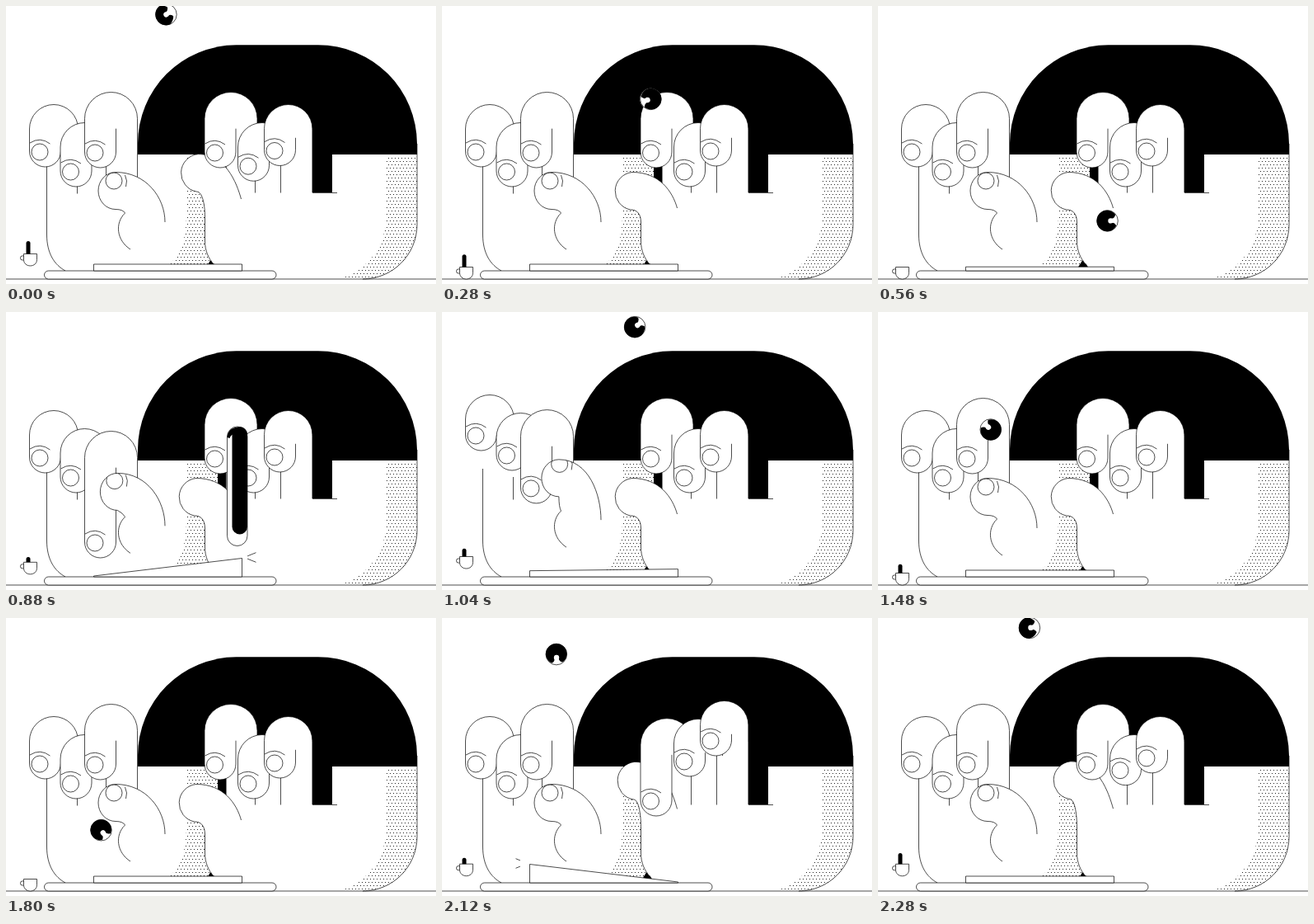
An HTML page that plays this animation: 522 by 337 pixels, repeating every 2.32 s.

```html
<!DOCTYPE html>
<html lang="en">
<head>
<meta charset="utf-8">
<title>Juggling hands</title>
<style>
html, body { margin: 0; width: 100%; height: 100%; overflow: hidden; background: #fff; }
svg { display: block; width: 522px; height: 337px; }
.line { fill: none; stroke: #000; stroke-width: .7; }
.skin { fill: #fff; stroke: #000; stroke-width: .7; }
.white { fill: #fff; }
</style>
</head>
<body>
<svg viewBox="0 0 522 337">
  <defs>
    <pattern id="dots" width="4" height="8" patternUnits="userSpaceOnUse">
      <path d="M0 0h1v1H0zM2 4h1v1H2z" fill="#222"/>
    </pattern>
    <clipPath id="thumbClip"><path id="thumbClipPath"/></clipPath>
    <clipPath id="ballClip"><circle r="13"/></clipPath>
  </defs>

  <!-- big rounded figure -->
  <path d="M160 180V167A119.500 119.500 0 0 1 279.500 47.300H379A120 120 0 0 1 499 167V180H396V226H257V180Z"/>
  <path d="M219 181H257V262H241V290L250 313H199C214 298 219 280 219 250Z" fill="url(#dots)"/>
  <path d="M462 181H499V265A66 66 0 0 1 433 331H405C440 319 462 292 462 250Z" fill="url(#dots)"/>
  <path class="line" d="M499 167V265A66 66 0 0 1 433 331M372 226.500H402M0 331H522"/>
  <path d="M249 307L242 318H256Z"/>

  <!-- right hand -->
  <path class="white" d="M267.500 150H372V313H267.500Z"/>
  <path class="skin" id="thumbR"/>
  <path class="line" d="M302.500 190V226.500M333.500 165V226.500"/>
  <g id="handR"></g>

  <!-- left hand -->
  <path class="white" d="M49.500 190H159V321H72C58 314 49.500 300 49.500 280Z"/>
  <path class="line" d="M49.500 190V277C49.500 300 59 314 72 321M86.500 200V227.500M121.500 190V227.500"/>
  <g id="handL"></g>
  <path class="skin" id="thumbL"/>
  <g clip-path="url(#thumbClip)">
    <g id="thumbNail">
      <circle class="line" r="10"/>
      <path class="line" d="M13.500 -7Q17 0 14.500 7"/>
    </g>
  </g>

  <rect class="skin" x="46.500" y="321" width="281.500" height="10" rx="5"/>
  <path class="skin" id="lever"/>
  <path class="line" id="sparks"/>

  <rect id="coffee" x="24.500" width="5" rx="2.500"/>
  <g id="cup">
    <path class="skin" d="M21.500 3H19.500Q17.500 3 17.500 5.500T19.500 8H21.500"/>
    <path class="skin" d="M21.500 .5H37.500V7.500C37.500 12 34 15 29.500 15S21.500 12 21.500 7.500Z"/>
  </g>

  <g id="ball">
    <circle class="white" r="13"/>
    <g clip-path="url(#ballClip)">
      <g id="spin">
        <circle id="shade" r="13"/>
        <g id="mark" class="white">
          <circle cx="4" r="3.200"/>
          <path d="M5 -2.500Q9 -3 10 -8H18V7H11Q9 2 5 2.500Z"/>
        </g>
      </g>
    </g>
    <circle class="line" r="12.800"/>
  </g>
  <g id="streak">
    <rect class="skin" id="streakOut" width="24.500" rx="12.250"/>
    <rect id="streakIn" x="6" width="18.500" rx="9.250"/>
    <path d="M0 13A12.250 12.250 0 0 1 24.500 13L12 18V9Q5 8 3 14Z"/>
    <circle class="white" cx="3" cy="16" r="2"/>
  </g>
</svg>
<script>
const LOOP = 2320, HALF = LOOP / 2, LAUNCH = 841, APEX = 1145, LAND = 1642, SETTLE = 1894;
const $ = id => document.getElementById(id);
const set = (el, attrs) => { for (const k in attrs) el.setAttribute(k, attrs[k]); };
const show = (el, on) => { el.style.display = on ? '' : 'none'; };
const wrap = t => (t % LOOP + LOOP) % LOOP;

function ease(t, from, to) {
  const u = Math.min(1, Math.max(0, (t - from) / (to - from)));
  return u * u * (3 - 2 * u);
}
// Rises between a and b, falls between c and d
const pulse = (t, a, b, c, d) => ease(t, a, b) - ease(t, c, d);

// Each motion gives the shift of the knuckle and of the fingertip
const lift = (h, from, to) => [-19 * pulse(h, 860, 960, 1020, 1120), -27 * pulse(h, 860, 960, from, to)];
const outer = h => lift(h, 1000, 1175);
const middle = h => lift(h, 1050, 1215);
const press = h => {
  const p = pulse(h, 740, 800, 860, 1045);
  return [40 * p, 102 * p];
};

function makeFinger(hand, motion, x, r, top, nail, side = 0, crease = 1.38 * r) {
  const g = document.createElementNS('http://www.w3.org/2000/svg', 'g');
  g.innerHTML = '<path class="white"/><path class="line"/><circle class="line" r="10"/><path class="line"/>';
  $(hand).append(g);
  const [fill, edge, disc, brow] = g.children;
  const inner = x + 38;
  set(disc, { cx: x + 12.5 });
  return h => {
    const [up, tip] = motion(h);
    const y = top + up, n = nail + tip, c = y + r, end = side || c + 15;
    const low = `V${n - 1}A19 19 0 0 1 ${x} ${n - 1}V${c}A${r} ${r} 0 0 1 ${x + 2 * r} ${c}V${end}`;
    set(fill, { d: `M${inner} ${end}${low}Z` });
    set(edge, { d: `M${inner} ${y + crease}${low}` });
    set(disc, { cy: n });
    set(brow, { d: `M${x + .5} ${n - 11}Q${x + 13} ${n - 19} ${x + 25} ${n - 10}` });
  };
}

const left = [
  makeFinger('handL', outer, 28.5, 29.5, 119.5, 177, 0, 54),
  makeFinger('handL', middle, 66, 29.5, 141.5, 201),
  makeFinger('handL', press, 95.5, 32, 104.5, 178, 207)
];
const right = [
  makeFinger('handR', press, 241, 32, 104.5, 178),
  makeFinger('handR', middle, 281.5, 29.5, 141.5, 201),
  makeFinger('handR', outer, 313.5, 29.2, 119.5, 176, 226)
];

const thumbLift = h => pulse(h, 720, 990, 1110, 1280);
const shifter = (dx, dy) => (x, y) => `${x + dx} ${y + dy} `;

function leftThumb(k) {
  const base = shifter(0, -10 * k), tip = shifter(9 * k, -23 * k);
  return `M${base(193, 262)}C${base(193, 232)}${tip(170, 201.5)}${tip(133, 201.5)}` +
    `A21 22.500 0 0 0 ${tip(133, 246.5)}Q${base(142, 246.5)}${base(144.5, 251)}` +
    `C${base(132, 263)}${base(134, 284)}${base(151, 295)}`;
}

function rightThumb(k) {
  const base = shifter(0, -14 * k), tip = shifter(3 * k, -28 * k), neck = shifter(0, -10 * k);
  return `M${base(285.5, 245)}C${base(280, 225)}${tip(264, 201.5)}${tip(231, 201.5)}` +
    `A23 23 0 0 0 ${tip(229, 247)}C${tip(237, 246.5)}${neck(241.5, 253)}${neck(241.5, 262)}` +
    'V285C241.500 297 246 306 252 313';
}

function drawHands(t) {
  const hl = wrap(t - 70), hr = wrap(t - HALF);
  left.forEach(f => f(hl));
  right.forEach(f => f(hr));
  const k = thumbLift(hl), d = leftThumb(k);
  set($('thumbL'), { d });
  set($('thumbClipPath'), { d });
  set($('thumbNail'), { transform: `translate(${131 + 12 * k * k} ${212 - 28 * k})` });
  set($('thumbR'), { d: rightThumb(thumbLift(hr)) });
}

function ballY(q) {
  if (q < LAUNCH || q >= SETTLE) return 300;
  if (q < APEX) return 10 + 290 * Math.exp((LAUNCH - q) / 56);
  if (q < LAND) return 10 + 290 * ((q - APEX) / (LAND - APEX)) ** 2;
  const mid = (LAND + SETTLE) / 2;
  return 254 + .0029 * (q - mid) ** 2;
}

function ballX(q) {
  const u = Math.min(1, Math.max(0, (q - 870) / 880));
  return 112 + 166 * Math.sin(u * Math.PI / 2) + 6 * ease(q, LAND, LAUNCH + HALF);
}

function drawBall(t, q, toLeft) {
  const x = toLeft ? 396 - ballX(q) : ballX(q), y = ballY(q), fast = q < 930;
  show($('ball'), !fast);
  show($('streak'), fast);
  if (fast) {
    const len = ballY(q - 34) - y + 26;
    set($('streak'), { transform: `translate(${x - 12.25} ${y - 13})` });
    set($('streakOut'), { height: len });
    set($('streakIn'), { height: Math.max(19, len - 14) });
    return;
  }
  const rel = t > HALF ? t - LOOP : t;
  const turn = toLeft ? 60 + .59 * (t - 1200) : -30 - .59 * rel;
  const reveal = 4 * Math.exp(-(((q - 1170) / 70) ** 2));
  set($('ball'), { transform: `translate(${x} ${y})` });
  set($('spin'), { transform: `rotate(${turn})` });
  set($('shade'), { cx: -1 - reveal });
  set($('mark'), { transform: `translate(${-reveal} 0)` });
}

function drawLever(q, toLeft) {
  const rest = 313 + 5 * pulse(q, LAND, LAND + 18, LAND + 18, LAND + 168);
  const kick = pulse(q, LAUNCH, LAUNCH + 29, 960, 1060);
  const high = rest - 14.5 * kick, low = rest + 7 * kick;
  const [a, b] = toLeft ? [low, high] : [high, low];
  set($('lever'), { d: `M106.500 ${a}L286.500 ${b}V321H106.500Z` });

  const on = q > 850 && q < 995;
  show($('sparks'), on);
  if (!on) return;
  const near = 6.5 + (q - 880) / 16;
  const point = (s, v) => `${toLeft ? 286.5 + s : 106.5 - s} ${297.5 + v * (s * .4 - 1)}`;
  set($('sparks'), { d: [-1, 1].map(v => `M${point(near, v)}L${point(17, v)}`).join('') });
}

function drawCup(t) {
  const m = t % HALF, c = m < LAUNCH ? m + HALF : m;
  const top = 316 - Math.max(0, 20 - .00027 * (c - 1040) ** 2);
  const spill = 285 + .000178 * (c - 1140) ** 2, h = top - spill;
  set($('cup'), { transform: `translate(0 ${top})` });
  show($('coffee'), h > .5);
  set($('coffee'), { y: spill, height: Math.max(0, h) + 4 });
}

function draw(now) {
  const t = wrap(now);
  const toLeft = t >= LAUNCH && t < LAUNCH + HALF;
  // Time within one throw, the same for both directions
  const q = toLeft ? t : t < LAUNCH ? t + HALF : t - HALF;
  drawHands(t);
  drawLever(q, toLeft);
  drawCup(t);
  drawBall(t, q, toLeft);
}

const start = performance.now();
function tick() {
  draw(performance.now() - start);
  requestAnimationFrame(tick);
}
tick();
</script>
</body>
</html>
```
